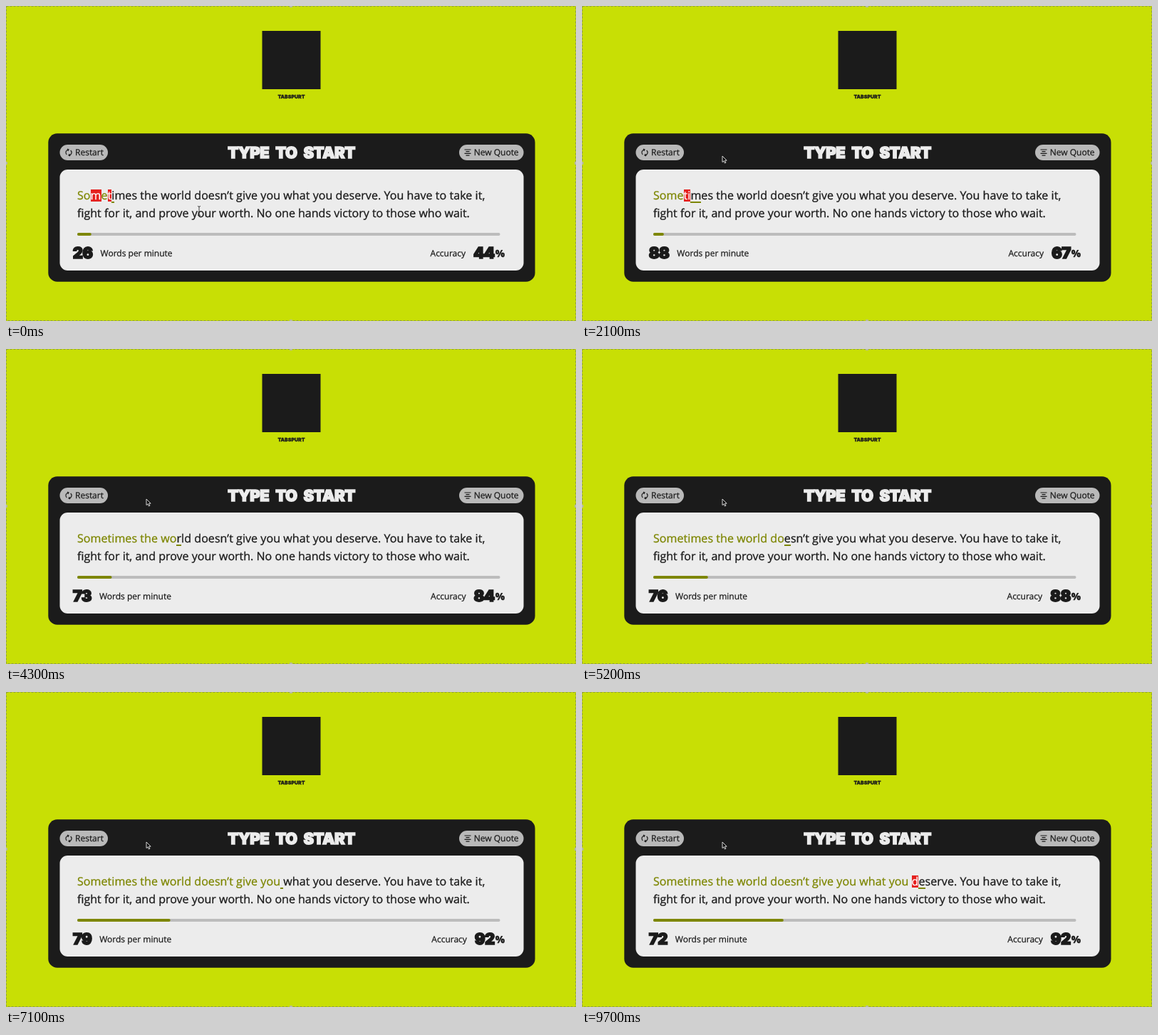
Recreate the animation shown at these times as an HTML page. Size 800 px wide and 443 px high, loop 9.8 s.

```html
<!DOCTYPE html>
<html lang="en">
<head>
<meta charset="utf-8">
<title>Typing test</title>
<style>
  html, body { margin: 0; width: 100%; height: 100%; overflow: hidden; background: #c8df05; }
  #stage { position: relative; width: 800px; height: 443px; overflow: hidden; }
  svg { position: absolute; left: 0; top: 0; }
  text, .line { font-family: "Open Sans", sans-serif; text-rendering: geometricPrecision; }
  text { font-size: 12px; font-weight: 500; fill: #1b1b1b; stroke: #1b1b1b; stroke-width: .25; white-space: pre; }
  .heavy { font-family: Inter, sans-serif; font-weight: 900; }
  .title { font-size: 22px; letter-spacing: -.5px; word-spacing: 5px; fill: #ececec; stroke: #ececec; stroke-width: 1.5; }
  .brand { font-size: 7px; }
  .num { font-size: 22px; letter-spacing: -.6px; stroke-width: 1.6; }
  .pct { font-size: 14px; font-weight: 800; }
  .icon { fill: none; stroke: #1b1b1b; stroke-width: 1.2; }
  .line { position: absolute; left: 100px; font-size: 16px; line-height: 24.5px; white-space: pre; color: #1b1b1b; -webkit-text-stroke: .3px; }
  .line span { position: relative; }
  .ok { color: #7d8600; }
  .bad { color: #fff; background: linear-gradient(#e5211f, #e5211f) 0 2.5px / 100% 17px no-repeat; }
  .cur::after { content: ""; position: absolute; left: 0; right: 0; top: 19.8px; height: 2.2px; background: #7d8600; }
</style>
</head>
<body>
<div id="stage">
  <svg width="800" height="443" viewBox="0 0 800 443">
    <rect width="800" height="443" fill="#c8df05"/>
    <rect x=".5" y=".5" width="799" height="442" fill="none" stroke="#8f9c45" stroke-dasharray="3 2"/>
    <path d="M398 0h4v2h-4zM398 441h4v2h-4zM0 219h2v4h-2zM798 219h2v4h-2z" fill="#b9bd9a"/>

    <rect x="359.5" y="35" width="82" height="82" fill="#1b1b1b"/>
    <text class="heavy brand" x="400.5" y="130" text-anchor="middle">TABSPURT</text>

    <rect x="59.3" y="179.3" width="683.2" height="208.4" rx="12.5" fill="#1b1b1b"/>
    <rect x="75.5" y="230" width="651" height="142" rx="11" fill="#ececec"/>
    <text class="heavy title" x="400.5" y="213.7" text-anchor="middle">TYPE TO START</text>

    <rect x="75.5" y="195" width="67.5" height="22" rx="11" fill="#b9b9b9"/>
    <path class="icon" d="M85.3 209A4 4 0 0 1 87.6 202M86 201l2 1-1.2 2M90.7 203A4 4 0 0 1 88.4 210M90 211l-2-1 1.2-2"/>
    <text x="97" y="210.3">Restart</text>
    <rect x="636" y="195" width="90.5" height="22" rx="11" fill="#b9b9b9"/>
    <path class="icon" d="M643.5 202h9M645.5 204.7h5M643.5 207.4h9M645.5 210.1h5"/>
    <text x="656.7" y="210.3">New Quote</text>

    <rect x="100" y="319" width="593.5" height="4" rx="2" fill="#bcbcbc"/>
    <rect id="bar" x="100" y="319" width="0" height="4" rx="2" fill="#7d8600"/>

    <text x="93.7" y="355.3"><tspan class="heavy num" id="wpm">0</tspan><tspan dx="11" dy="-3.5">Words per minute</tspan></text>
    <text x="700" y="351.8" text-anchor="end">Accuracy<tspan class="heavy num" id="acc" dx="11" dy="3.5">0</tspan><tspan class="pct" dx="1" dy="-2.3">%</tspan></text>
  </svg>

  <div class="line" style="top:254px;letter-spacing:.06px"></div>
  <div class="line" style="top:278.5px"></div>

  <svg width="800" height="443" viewBox="0 0 800 443">
    <g id="mouse">
      <path id="beam" d="M-2-6.5Q0-6.5 0-5V5Q0 6.5-2 6.5M2-6.5Q0-6.5 0-5M0 5Q0 6.5 2 6.5M-1.5 1.5h3" fill="none" stroke="#333" stroke-width=".9"/>
      <path id="arrow" d="M0 0V8.6L2 6.8L3.4 10L4.9 9.3L3.5 6.2H6.2Z" fill="#111" stroke="#e8e8e8" stroke-width=".9"/>
    </g>
  </svg>
</div>
<script>
const LOOP = 9800, STEP = 100, GLIDE = 700, START = 1180;
const BAR = 593.5, TOTAL = 150;
const $ = id => document.getElementById(id);

const quote = [
  "Sometimes the world doesn’t give you what you deserve. You have to take it,",
  "fight for it, and prove your worth. No one hands victory to those who wait."
];
const chars = [];
document.querySelectorAll(".line").forEach((line, i) => {
  for (const c of quote[i]) {
    const span = document.createElement("span");
    span.textContent = c;
    line.append(span);
    chars.push(span);
  }
});

// Keystrokes: + right, x wrong, < backspace, 0 restart
const FIRST = "++x+x";
const events = [];
function press(ops, from, to = from) {
  [...ops].forEach((op, i, all) => {
    const time = from + (to - from) * i / Math.max(1, all.length - 1);
    const step = op === "0" ? -FIRST.length : op === "<" ? -1 : 1;
    events.push({ op, time, step });
  });
}
press("0", 1050);
press("+", 1271);
press("+++", 1400, 1720);
press("xxx", 1860, 2140);
press("<<<", 2400, 2700);
press("+", 2865);
press("+".repeat(11), 3240, 4290);
press("+".repeat(12), 4440, 5985);
press("+".repeat(8), 6130, 7090);
press("+".repeat(10), 7260, 8900);
press("x", 9490);

const smooth = x => {
  x = Math.min(1, Math.max(0, x));
  return x * x * (3 - 2 * x);
};

function stateAt(t) {
  let marks = FIRST, wpm = 26, acc = 44, typed = 0, right = 0, bar = FIRST.length;
  for (const { op, time, step } of events) {
    if (time > t) break;
    bar += step * smooth((t - time) / GLIDE);
    if (op === "0") {
      marks = "";
      wpm = acc = 0;
      continue;
    }
    if (op === "<") {
      marks = marks.slice(0, -1);
    } else {
      marks += op;
      typed++;
      if (op === "+") right++;
    }
    wpm = Math.round(typed / 5 / ((time - START) / 60000));
    acc = Math.round(100 * right / typed);
  }
  return { marks, wpm, acc, bar };
}

const path = [[0, 271, 288], [300, 271, 288], [850, 116, 207], [1060, 116, 207], [1300, 197, 211], [LOOP, 197, 211]];
function mouseAt(t) {
  const i = path.findIndex(p => p[0] > t);
  const [t0, x0, y0] = path[i - 1], [t1, x1, y1] = path[i];
  const k = smooth((t - t0) / (t1 - t0));
  return [x0 + (x1 - x0) * k, y0 + (y1 - y0) * k];
}

function draw(t) {
  const { marks, wpm, acc, bar } = stateAt(t);
  chars.forEach((span, i) => {
    span.className = i === marks.length ? "cur" : i > marks.length ? "" : marks[i] === "+" ? "ok" : "bad";
  });
  $("wpm").textContent = wpm;
  $("acc").textContent = acc;
  $("bar").setAttribute("width", bar / TOTAL * BAR);

  const [x, y] = mouseAt(t), overText = y > 256;
  $("mouse").setAttribute("transform", `translate(${x} ${y})`);
  $("beam").style.display = overText ? "" : "none";
  $("arrow").style.display = overText ? "none" : "";
}

let begin, shown = -1;
function tick(now) {
  begin ??= now;
  const t = Math.floor((now - begin) % LOOP / STEP) * STEP;
  if (t !== shown) draw(shown = t);
  requestAnimationFrame(tick);
}
draw(0);
requestAnimationFrame(tick);
</script>
</body>
</html>
```
